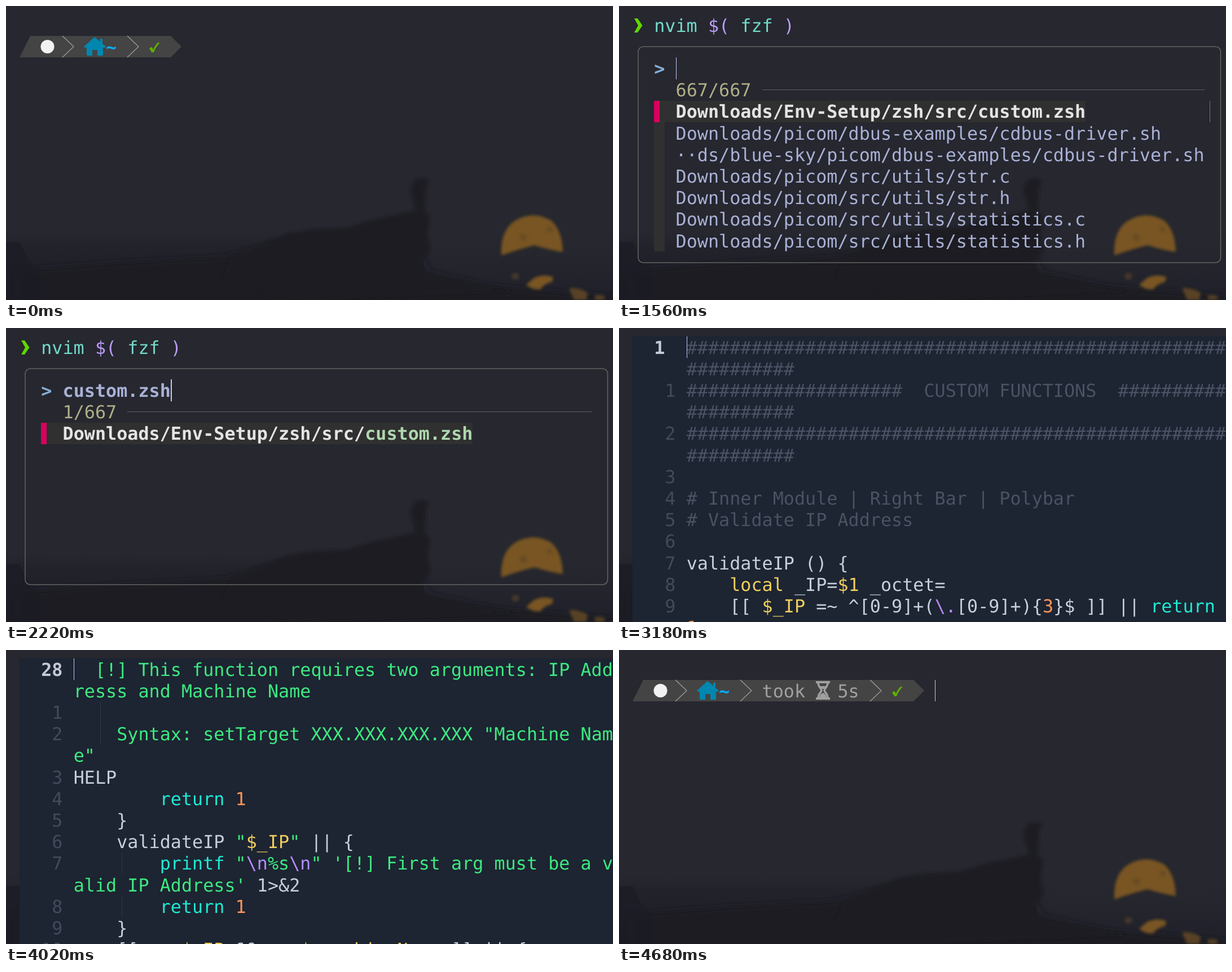
An HTML page that plays this animation: 1076 px wide and 521 px high, repeating every 5040 ms.

```html
<!DOCTYPE html>
<html lang="en">
<head>
<meta charset="utf-8">
<title>Terminal session</title>
<style>
  html, body { margin: 0; width: 100%; height: 100%; overflow: hidden; background: #26272f; }
  svg { display: block; width: 1076px; height: 521px; }
  text {
    font: 31.775px "DejaVu Sans Mono", monospace;
    white-space: pre;
    text-rendering: geometricPrecision;
  }
  .bold { font-weight: bold; }
</style>
</head>
<body>
<svg viewBox="0 0 1076 521">
  <defs>
    <linearGradient id="haze" x1="0" y1="0" x2="0" y2="1">
      <stop offset="0" stop-color="#23242c" stop-opacity="0"/>
      <stop offset=".2" stop-color="#22232b"/>
      <stop offset="1" stop-color="#1b1b25"/>
    </linearGradient>
    <linearGradient id="sea" x1="0" y1="0" x2="0" y2="1">
      <stop offset="0" stop-color="#24252d" stop-opacity="0"/>
      <stop offset="1" stop-color="#1e1f28"/>
    </linearGradient>
    <filter id="soft" x="-20%" y="-20%" width="140%" height="140%"><feGaussianBlur stdDeviation="2.5"/></filter>
    <filter id="fog" x="-20%" y="-40%" width="140%" height="180%"><feGaussianBlur stdDeviation="14 5"/></filter>
  </defs>
  <rect width="1076" height="521" fill="#26272f"/>
  <rect y="398" width="740" height="123" fill="url(#haze)"/>
  <rect x="740" y="400" width="336" height="121" fill="url(#sea)"/>
  <path d="M0 470L200 455L390 445L520 410L700 400L740 470L860 497L1076 515V540H0Z" fill="#1b1b24" filter="url(#fog)"/>
  <path d="M0 418H24L40 450L60 470V530H0Z" fill="#1c1c25" opacity=".7"/>
  <g fill="#1b1b24" filter="url(#soft)">
    <path d="M500 403L545 396L605 393L650 379L705 367L740 360L752 374L747 404L752 432L735 455L734 470L760 482L900 505L500 521L385 480L400 445Z"/>
    <path d="M727 308Q738 303 750 309Q742 320 744 332Q743 346 741 362L724 362Q727 347 718 336Q715 318 727 308Z"/>
  </g>
  <g fill="#785524" filter="url(#soft)">
    <path d="M878 442Q876 400 900 382Q932 361 966 380Q986 397 987 436Q962 432 937 424Q908 431 878 442Z"/>
    <path d="M922 494L936 482Q952 474 970 480L968 489Q954 492 947 502Q934 504 922 494Z"/>
    <path d="M998 500Q1014 498 1031 508L1029 521H1007Z" opacity=".65"/>
    <path d="M1042 514Q1052 509 1063 516L1058 521H1046Z" opacity=".6"/>
    <ellipse cx="903" cy="479" rx="7" ry="6" opacity=".4"/>
  </g>
  <g fill="#5d4526" filter="url(#soft)" opacity=".6">
    <circle cx="917" cy="410" r="6"/><circle cx="964" cy="396" r="5"/>
  </g>
  <g id="screen"></g>
</svg>
<script>
const LOOP = 5040, LEFT = 24, TOP = 15, CELL_W = 19.13, CELL_H = 38.2, COLS = 50;
const BASELINE = 30.6;

// A "§" followed by a key sets the colour; a capital key is bold.
const COLORS = {
  t: '#73daca', p: '#bb9af7', r: '#f7768e', w: '#a9b1d6', b: '#87afd7', k: '#afaf87',
  h: '#87af87', s: '#e4e4e4', l: '#afd7af', a: '#a0a0a0', x: '#00afff',
  e: '#c6cfdd', m: '#4a5263', n: '#414b5c', u: '#c3c9d5', g: '#3dea80', c: '#1eead3',
  o: '#ff9657', y: '#f0cf5c', v: '#b48cfa'
};

const colX = c => LEFT + c * CELL_W;
const rowY = r => TOP + r * CELL_H;
const escape = s => s.replace(/&/g, '&amp;').replace(/</g, '&lt;');

function box(x, y, right, bottom, fill) {
  const l = Math.round(x), t = Math.round(y);
  return `<rect x="${l}" y="${t}" width="${Math.round(right) - l}" height="${Math.round(bottom) - t}" fill="${fill}"/>`;
}

const cursor = (row, col) =>
  box(colX(col) + .3, rowY(row), colX(col) + 1.8, rowY(row + 1), '#c0caf5');

function parse(markup) {
  const cells = [];
  let key = 'e';
  for (let i = 0; i < markup.length; i++) {
    if (markup[i] === '§') key = markup[++i];
    else cells.push({ ch: markup[i], key });
  }
  return cells;
}

function drawCells(row, col, cells) {
  let out = '';
  for (let i = 0; i < cells.length;) {
    const { ch, key } = cells[i], start = i;
    if (ch === '│') {
      const x = colX(col + i + .5);
      out += box(x - .5, rowY(row), x + .5, rowY(row + 1), '#303848');
      i++;
      continue;
    }
    let run = '';
    while (i < cells.length && cells[i].key === key && cells[i].ch !== '│') run += cells[i++].ch;
    if (!run.trim()) continue;
    const lower = key.toLowerCase();
    const bold = key === lower ? '' : ' class="bold"';
    out += `<text x="${colX(col + start).toFixed(2)}" y="${Math.round(rowY(row) + BASELINE)}" fill="${COLORS[lower]}"${bold}>${escape(run)}</text>`;
  }
  return out;
}

const print = (row, col, markup) => drawCells(row, col, parse(markup));

// Shell prompt
const chevron = x => `<path d="M${x} 0l20 19l-20 19" fill="none" stroke="#a0a0a0" stroke-width="1.2"/>`;

const HOURGLASS = `<g fill="#a0a0a0"><path d="M325 2h25v4h-25zM325 31h25v4h-25zM331 31q1-6 6.500-8q5.500 2 6.500 8z"/>
  <path d="M329 5C329 13 335 15 335 18.500C335 22 329 24 329 32M346 5C346 13 340 15 340 18.500C340 22 346 24 346 32" fill="none" stroke="#a0a0a0" stroke-width="3.500"/>
  <path d="M332 11h11l-4 5h-3z"/></g>`;

function prompt(row, took) {
  const end = took ? 498 : 268;
  return `<g transform="translate(${LEFT} ${Math.round(rowY(row))})">
    <path d="M0 38L19 0H${end}L${end + 19} 19L${end} 38Z" fill="#444"/>
    <circle cx="49.500" cy="19" r="12" fill="#f2f2f2"/>
    ${chevron(76)}${chevron(191)}${took ? chevron(421) + HOURGLASS : ''}
    <path d="M133 2L143 10V5H147V14L153 19Q152 21 148 21V33Q148 35 146 35H138V25H129V35H121Q119 35 119 33V21Q115 21 114 19Z" fill="#0087af"/>
    <path transform="translate(${end - 268})" d="M230 22.500L234 19.500L237 24Q241 15 246 11.500L248.500 12.500Q241 20 238 29L234.500 29Z" fill="#5faf00"/>
  </g>` + print(row, 8, '§X~') + (took ? print(row, 12, '§atook   5s') : '');
}

function command(n) {
  const s = 'nvim $( fzf )'.slice(0, n);
  return (n < 4 ? '§R' : '§t') + s.slice(0, 5) + (n < 7 ? '§w' : '§p') + s.slice(5, 8) +
    (n < 11 ? '§R' : '§t') + s.slice(8, 11) + '§p' + s.slice(11);
}

const shell = n => prompt(1) + print(1, 16, command(n)) + (n ? cursor(1, 16 + n) : '');
const history = () =>
  '<path d="M27 22H33L41.500 34.500L33 47H27L34 34.500Z" fill="#5fd700"/>' + print(0, 2, command(13));

// Fuzzy finder: backticks enclose the letters a query can match.
const FILES = [
  'Downloads/Env-Setup/zsh/src/`custom.zsh`',
  'Downloads/picom/dbus-examples/`c`db`us`-driver.sh',
  '··ds/blue-sky/picom/dbus-examples/`c`db`us`-driver.sh',
  ...['tr.c', 'tr.h', 'tatistics.c', 'tatistics.h'].map(f =>
    'Downloads/picom/sr`c`/`u`tils/`st`' + f.slice(1)),
  'Downloads/picom/src/utils/string_`custom`_map.c',
  '··ds/blue-sky/picom/src/utils/string_`custom`_map.c'
];
const matchable = f => f.split('`').filter((_, i) => i % 2).join('').length;

function highlight(file, limit, base, hit) {
  let marked = false, used = 0, out = '';
  for (const ch of file) {
    if (ch === '`') marked = !marked;
    else out += '§' + (marked && used++ < limit ? hit : base) + ch;
  }
  return out;
}

function finder(query, count, active = true) {
  const info = count + '/667', mid = CELL_H / 2;
  const rows = FILES.filter(f => matchable(f) >= query.length).slice(0, 7);
  let out = history() +
    `<rect x="34" y="72" width="1032.500" height="382.800" rx="9" fill="none" stroke="#626262" stroke-width="1.600"/>` +
    print(2, 2, '§B> §W' + query) + print(3, 4, '§k' + info) +
    box(colX(5 + info.length), rowY(3) + mid - .7, colX(53), rowY(3) + mid + .5, '#626262');
  rows.forEach((file, i) => {
    const row = 4 + i, y = rowY(row), bottom = rowY(row + 1);
    const length = file.replace(/`/g, '').length;
    out += box(colX(2), y, i ? colX(3) : colX(4 + length), bottom, '#303030');
    if (!i) out += box(colX(2), y, colX(2.5), bottom, '#d7005f');
    out += print(row, 4, i ? highlight(file, query.length, 'w', 'h') : highlight(file, query.length, 'S', 'L'));
  });
  if (count > 7) out += box(1047, rowY(4), 1048, rowY(5), '#747474');
  return out + (active ? cursor(2, 4 + query.length) : '');
}

// Editor
const hashes = n => '#'.repeat(n);
const FAIL = '§creturn §o1';
const SOURCE = [
  '§m' + hashes(60),
  '§m' + hashes(20) + '  CUSTOM FUNCTIONS  ' + hashes(20),
  '§m' + hashes(60),
  '',
  '§m# Inner Module | Right Bar | Polybar',
  '§m# Validate IP Address',
  '',
  'validateIP () {',
  '    §ylocal §e_IP=§y$1 §e_octet=',
  '    [[ §y$_IP §e=~ ^[0-9]+(§v\\.§e[0-9]+){§o3§e}$ ]] || ' + FAIL,
  '    §cfor §e_octet §cin §y${_IP//./ }§e; §cdo',
  '    │   §e(( _octet <= §o255 §e)) || ' + FAIL,
  '    §cdone',
  '    §creturn §o0',
  '}',
  '',
  '§m# Inner Module | Right Bar | Polybar',
  '§m# Set Target Machine',
  '',
  'setTarget () {',
  '    §ylocal §e_IP=§y$1',
  '    §ylocal §e_machineName=§y$2',
  '    §ylocal §e_file=~/.config/target',
  '',
  '    [[ §y$# §e-eq §o2 §e]] || {',
  '        §ccat §e<< HELP',
  '',
  '§g  [!] This function requires two arguments: IP Addresss and Machine Name',
  '  │',
  '§g  │ Syntax: setTarget XXX.XXX.XXX.XXX "Machine Name"',
  'HELP',
  '        ' + FAIL,
  '    }',
  '    validateIP §g"§y$_IP§g" §e|| {',
  '    │   §cprintf §g"§v\\n§g%s§v\\n§g" \'[!] First arg must be a valid IP Address\' §e1>&2',
  '    │   ' + FAIL,
  '    }',
  '    [[ -n §y$_IP §e&& -n §y$_machineName §e]] || {',
  '    │   §cprintf §g"§v\\n§g%s§v\\n§g" \'[!] Empty argument\' §e1>&2',
  '    │   ' + FAIL,
  '    }',
  '    §cecho §g"§y$_IP $_machineName§g" §e> §g"§y$_file§g"',
  '}',
  '',
  '§m# Clear Target Machine',
  '',
  'clearTarget () {',
  '    §ylocal §e_file=~/.config/target',
  '    §cecho §g"" §e> §g"§y$_file§g"',
  '}'
].map(parse);

function editor(top, active = true) {
  let out = box(LEFT, TOP, 1076, 521, '#1d2432'), row = 0;
  for (let n = top; row < 14 && n <= SOURCE.length; n++) {
    const cells = SOURCE[n - 1], offset = n - top;
    out += print(row, 2, offset ? '§n' + String(offset).padStart(2) : '§U' + n);
    let i = 0;
    do {
      out += drawCells(row++, 5, cells.slice(i, i + COLS));
      i += COLS;
    } while (i < cells.length);
  }
  return out + (active ? cursor(0, 5) : '');
}

const KEY_TIMES = [0, 180, 240, 300, 360, 420, 480, 660, 780, 900, 960, 1080, 1140, 1260];
const QUERIES = [
  [1560, '', 667], [1680, 'cu', 203], [1740, 'cus', 84], [1800, 'cust', 31], [1860, 'custom', 3],
  [1980, 'custom.', 1], [2100, 'custom.z', 1], [2160, 'custom.zs', 1], [2220, 'custom.zsh', 1]
];
const SCROLLS = [[3720, 8], [3780, 15], [3900, 21], [4020, 28], [4140, 35]];

const SCENES = [
  ...KEY_TIMES.map((at, n) => [at, () => shell(n)]),
  [1440, history],
  ...QUERIES.map(([at, query, count]) => [at, () => finder(query, count)]),
  [2940, () => finder('custom.zsh', 1, false)],
  [3120, () => ''],
  [3180, () => editor(1)],
  [3480, () => editor(1, false)],
  ...SCROLLS.map(([at, top]) => [at, () => editor(top)]),
  [4380, history],
  [4620, () => history() + prompt(2, true) + cursor(2, 28)],
  [4680, () => prompt(1, true) + cursor(1, 28)]
];

const screenEl = document.getElementById('screen');
const began = performance.now();
let shown = null;

function tick() {
  const time = (performance.now() - began) % LOOP;
  const scene = SCENES.findLast(([at]) => at <= time);
  if (scene !== shown) {
    screenEl.innerHTML = scene[1]();
    shown = scene;
  }
  requestAnimationFrame(tick);
}
tick();
</script>
</body>
</html>
```
